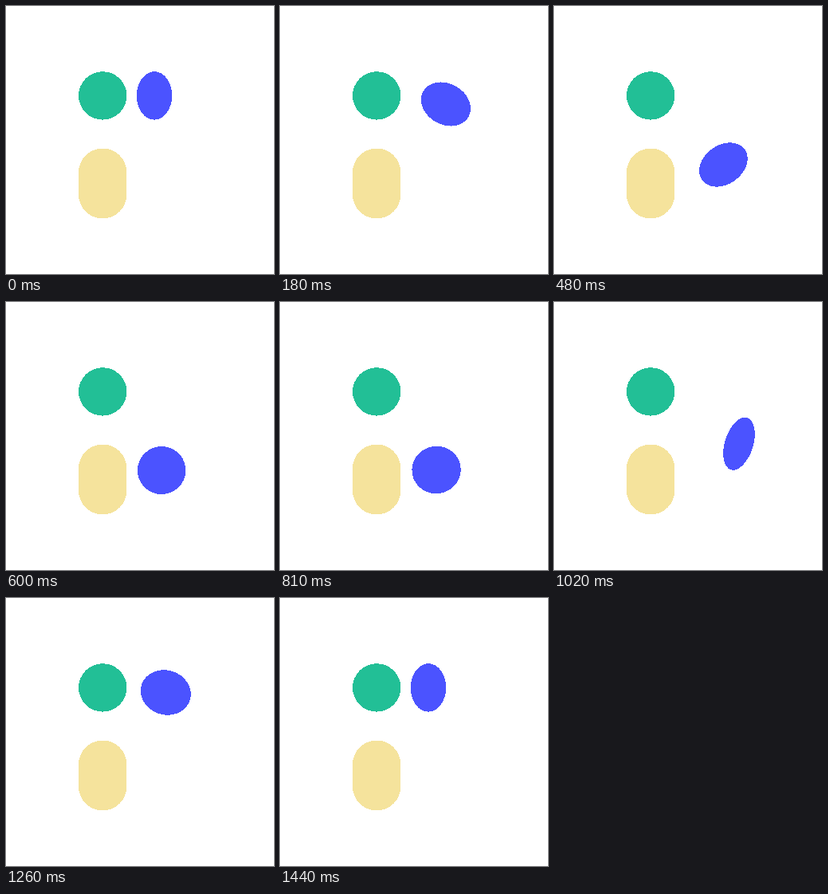
An HTML page for the animation above (1470 ms loop, 336 by 336 pixels).

```html
<!DOCTYPE html>
<html lang="en">
<head>
<meta charset="utf-8">
<title>Bouncing dot</title>
<style>
  html, body { margin: 0; width: 100%; height: 100%; overflow: hidden; background: #fff; }
  svg { display: block; width: 100%; height: 100%; shape-rendering: crispEdges; }
</style>
</head>
<body>
<svg viewBox="0 0 336 336">
  <circle cx="121.2" cy="112.4" r="30.2" fill="#22bf96"/>
  <rect x="91" y="178.5" width="60.4" height="88" rx="30.2" fill="#f5e39c"/>
  <ellipse id="dot" fill="#4b53ff"/>
</svg>
<script>
  const LOOP = 1470, STEP = 30, LEG = 720, MID_Y = 162.2;
  const dot = document.getElementById('dot');

  // One half of the swing, from its middle to the wall:
  // [ms from middle, x, y offset, tilt, length, thickness]
  const half = [
    [42, 231.7, 16.1, 18.3, 68.4, 35.8],
    [100, 221, 30.8, 40.8, 67.2, 44],
    [198, 200.6, 43.5, 71.6, 63.8, 55.6],
    [255, 195.6, 48.6, 81, 61, 59.8],
    [300, 190.4, 49.6, 86, 55.6, 60.3],
    [340, 186, 49.8, 89.5, 44.5, 60.5],
    [360, 185.3, 49.8, 90, 42.8, 60.5]
  ];
  const mirror = ([t, x, y, tilt, len, thick]) => [-t, x, -y, -tilt, len, thick];
  const keys = [...half.map(mirror).reverse(), [0, 236, 0, 0, 68.3, 32], ...half];

  function slope(i, c) {
    const a = keys[i - 1], b = keys[i + 1];
    return a && b ? (b[c] - a[c]) / (b[0] - a[0]) : 0;
  }

  // Cubic Hermite through the keys
  function pose(t) {
    let i = 0;
    while (i < keys.length - 2 && t > keys[i + 1][0]) i++;
    const a = keys[i], b = keys[i + 1], d = b[0] - a[0];
    const s = (t - a[0]) / d, r = 1 - s;
    return [1, 2, 3, 4, 5].map(c =>
      r * r * (1 + 2 * s) * a[c] + s * s * (3 - 2 * s) * b[c] +
      d * s * r * (r * slope(i, c) - s * slope(i + 1, c)));
  }

  function draw(ms) {
    const t = Math.floor((ms % LOOP + 0.5) / STEP) * STEP;
    const v = (t + 20) % (2 * LEG);
    const [x, y, tilt, len, thick] = pose(v < LEG ? v - LEG / 2 : 1.5 * LEG - v);
    dot.setAttribute('rx', thick / 2);
    dot.setAttribute('ry', len / 2);
    dot.setAttribute('transform', `translate(${x} ${MID_Y + y}) rotate(${tilt})`);
  }

  const start = performance.now();
  function tick(now) {
    draw(Math.max(0, now - start));
    requestAnimationFrame(tick);
  }
  draw(0);
  requestAnimationFrame(tick);
</script>
</body>
</html>
```
